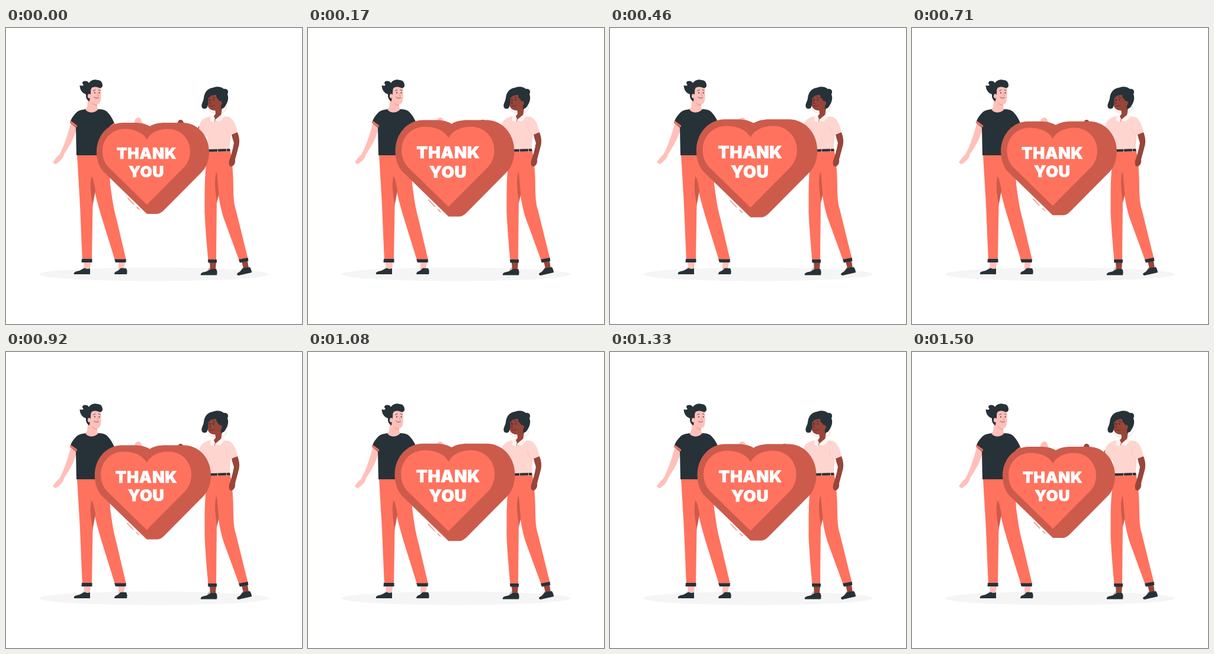
These frames come from a looping animation (500x500 px, 1.54 s). An HTML page:

```html
<!DOCTYPE html>
<html lang="en">
<head>
<meta charset="utf-8">
<title>Thank you</title>
<style>
  html, body { margin: 0; width: 100%; height: 100%; overflow: hidden; background: #fff; }
  svg { display: block; width: 100%; height: 100%; }
  .coral { fill: #ff725e; }
  .deep { fill: #cc5b4b; }
  .dark { fill: #263238; }
  .fair { fill: #ffc0b9; }
  .brown { fill: #98453a; }
  .blush { fill: #ffd5cf; }
  .line { fill: none; stroke-width: .8; stroke-linecap: round; }
  text { font: 900 26.3px Inter, sans-serif; letter-spacing: .5px; text-anchor: middle; fill: #fff; stroke: #fff; stroke-width: .6; }
</style>
</head>
<body>
<svg viewBox="0 0 500 500">
  <ellipse cx="250" cy="416" rx="193.5" ry="11.5" fill="#f5f5f5"/>

  <g id="man">
    <path class="fair" d="M131 395H143L142 406H132ZM190 395H201L199 407H190Z"/>
    <path class="dark" d="M142 406V416H115C114 413 117 411 122 410.500C127 409 130 406 133 405.500C136 407 139 407 142 406ZM203 406C205 409 205 413 204 416H183C183 413 185 411 188 410.500C191 409 192 406 195 405.500Z"/>
    <path class="line" stroke="#ffc0b9" d="M128 407L131 404L134 405M189 407L192 404.500L195 405"/>
    <path class="coral" d="M146 215H173C174 232 174 248 176 265C179 288 182 306 187 324L203 392H184L161 318C154 294 148 272 145 248Z"/>
    <path class="deep" d="M144 247C141 262 140 282 146 302L152 270Z"/>
    <path class="coral" d="M120 214H168L150 250L145 247C141 264 143 280 146.500 298L145 392H129C127 350 126 318 124.500 290Z"/>
    <path class="coral" d="M145.500 247L166 215H173L176 265L180 295L157 302Z"/>
    <path class="dark" d="M128 390H145.500V396H127.500ZM183 390.500H203L202.500 396H185Z"/>
    <path class="fair" d="M110 159L120 167C116 184 108 199 98 213C97 220 92 224 87 228C84 231 82 230 81 228C79 228 79 226 81 224C84 220 86 217 90 214C97 202 104 181 110 159Z"/>
    <path class="dark" d="M135 137C140 142 149 141 155 137C161 137 166 138 169 140C176 146 180 153 184 163L176 169L172 215H119L118 168L108 160C111 151 116 145 121 141C126 138 130 138 135 137Z"/>
    <path class="coral" d="M109 156.500L120 164.500L119.500 168L108 160ZM183 160L185 163L176 169L175 166Z"/>
    <path class="fair" d="M139 114L137 134L134 137C138 145 151 144 156 137L154 134V126Z"/>
    <path d="M144 125L154 129V132C149 131 146 129 144 125Z" fill="#f7a69e"/>
    <path class="fair" d="M141 102C147 98 156 98 160 100C161 108 161 116 160 122C159 128 155 130 150 128.500C145 127 142 122 141 117Z"/>
    <path class="dark" d="M141 124C137 122 134.500 118 135 112C129 110 125 105 124.500 97C127 97.500 129 98 131 96.500C127 92 130 89 134 89.500C137 89.500 139 91 140 93C143 88 150 86 155 88C160 88 163.500 92 163 98C162.500 101 159 102 157 101C153 99 148 99 145 101C142 104 144 109 142.500 113Z"/>
    <ellipse class="fair" cx="140.500" cy="115" rx="2.500" ry="3.800"/>
    <g class="dark"><ellipse cx="150" cy="109.500" rx=".8" ry="1.300"/><ellipse cx="157.500" cy="109.500" rx=".8" ry="1.300"/></g>
    <path class="line" stroke="#263238" d="M147.500 106L151 104.500M156 104.500L159 105.500M149 116.500C151 119 154 119 156.500 117.500"/>
    <path class="line" stroke="#ed847e" d="M154 110L156 114.500L154 115"/>
    <path class="fair" d="M216 164C217 156 218 153 222 151.500C227 150.500 229 154 231 164Z"/>
  </g>

  <g id="woman">
    <path class="brown" d="M344 395H355L354 408H345ZM398 394L408 393L410 406H401Z"/>
    <path class="dark" d="M355 407C357 410 357 414 356 417.500H329C328 415 331 412.500 336 412C341 411 343 408 346 407ZM412 404C414 407 415 410 415 413L393 418C390 418 389 415 392 413.500C397 411 398 407 402 405Z"/>
    <path class="line" stroke="#98453a" d="M341 409L344 405L347 407M398 408L400 405L403 405"/>
    <path class="coral" d="M352 208H379C382 225 384 244 384 270C384 283 385 297 388 306L409 391L394 393L368 322C362 304 359 285 356 260Z"/>
    <path class="deep" d="M355 240C352 256 350 270 356 296L362 270Z"/>
    <path class="coral" d="M342 208H372L360 250L355 243C351 260 354 277 356 292L355 392H341.500C338.500 360 336.500 334 335.500 310C336 280 334 244 342 208Z"/>
    <path class="coral" d="M356 242L368 209H378L382 260L377 284L360 288Z"/>
    <path class="dark" d="M341 391H356V396.500H341.500ZM393 391L408.500 388L409.500 393.500L395 396.500Z"/>
    <path class="brown" d="M381 179L391 176C394 184 395 190 393.500 198L387 222C388 228 385 233 381 234C377 234 376 230 377 224C380 216 383 206 385 194C384 190 382 186 381 179ZM325 166L331 168L328 188L322 182Z"/>
    <path class="blush" d="M345 149C337 151 331 154 328 160L324 177L340 184L342 207H378L379 181L391 176C388 161 383 153 376 150C370 149 365 149 361 149Z"/>
    <path class="line" stroke="#ffbfb6" d="M371 166C371 174 375 179 379 181L377 193"/>
    <path class="dark" d="M342 205L378 204L379 208L342 209Z"/>
    <path class="line" stroke="#ffd5cf" d="M357.500 204V209.500M372.500 204V209"/>
    <path class="brown" d="M353 134L366 131C364 140 364 145 363 149L352 158L351 149L354 145Z"/>
    <path d="M350 147L345 150L345 157L351 159L353 153ZM364 146L369 149.500L361 158L352 156Z" fill="#fff3f1"/>
    <path class="brown" d="M341 113C348 106 361 108 366 118C368 130 362 139 353 139.500C347 139.500 342 136 341 132C340 126 340 119 341 113Z"/>
    <path class="dark" d="M331 134C329 129 333 125 334 119C335 108 341 102 349 101C356 98 364 99 368 103C374 102 377 107 374 112C377 119 374 126 371 131C369 135 366 136 363 137C364 130 362 125 359 121C356 119 355 116 355 113C349 113 343 115 341.500 119C342 127 341 134 338 136C334 137 332 136 331 134Z"/>
    <ellipse class="brown" cx="362" cy="127" rx="2.800" ry="3.800"/>
    <path class="line" stroke="#ffc0b9" d="M371 131C374 137 370 143 364 143M342 137C343 141 347 143 351 143"/>
    <g class="dark"><ellipse cx="344" cy="121" rx=".8" ry="1.400"/><ellipse cx="350.500" cy="121.500" rx=".8" ry="1.400"/></g>
    <path class="line" stroke="#263238" d="M342.500 117L344.500 116.500M349 116.500L353 118"/>
    <path class="line" stroke="#5b2927" d="M346 121L343.500 127L346 128M344 131.500C347 133 350 132 352 130.500"/>
    <path class="brown" d="M289 164C290 157 292 155 295 155C298 155 300 158 301 164Z"/>
  </g>

  <g id="heart">
    <path class="line" stroke="#ff725e" style="stroke-width: 1.1" d="M206 287.500L216 298M221 302.500L225 306.500"/>
    <path class="deep" d="M238 314L165 243C157 235 153 222 153 209C153 182 172 160 198 160H218C228 160 236 162 243 166C249 162 258 160 268 160H298C324 160 343 182 343 209C343 222 339 235 331 243L266 308.500C262 312 259 314 254 314Z"/>
    <path class="coral" d="M238 298.500L174 236C166 228 163 218 163 208C163 187 179 170.500 200 170.500C218 170.500 232 177 238 188.500C244 177 257 170.500 274 170.500C295 170.500 311 187 311 208C311 218 308 228 300 236Z"/>
    <text x="237.500" y="221.200">THANK</text>
    <text x="237" y="252">YOU</text>
  </g>
</svg>
<script>
const LOOP = 1540, STEPS = 37;
// Pulse: [step, scale], straight runs between the points
const pulse = [[0, 1], [7.2, 1.104], [11, 1.076], [17, 1.03], [19.5, 1.011], [26, 1.069], [29, 1.093], [32, 1.058], [36, 1]];
const heart = document.getElementById("heart");

function scaleAt(step) {
  const i = Math.max(1, pulse.findIndex(([at]) => at >= step));
  const [a, from] = pulse[i - 1], [b, to] = pulse[i];
  return from + (to - from) * (step - a) / (b - a);
}

function draw() {
  // The small lead absorbs the rounding of the step times to 10 ms
  const step = Math.floor(performance.now() % LOOP / LOOP * STEPS + 0.1);
  heart.setAttribute("transform", `translate(247.5 237) scale(${scaleAt(Math.min(step, STEPS - 1))}) translate(-247.5 -237)`);
  requestAnimationFrame(draw);
}
draw();
</script>
</body>
</html>
```
